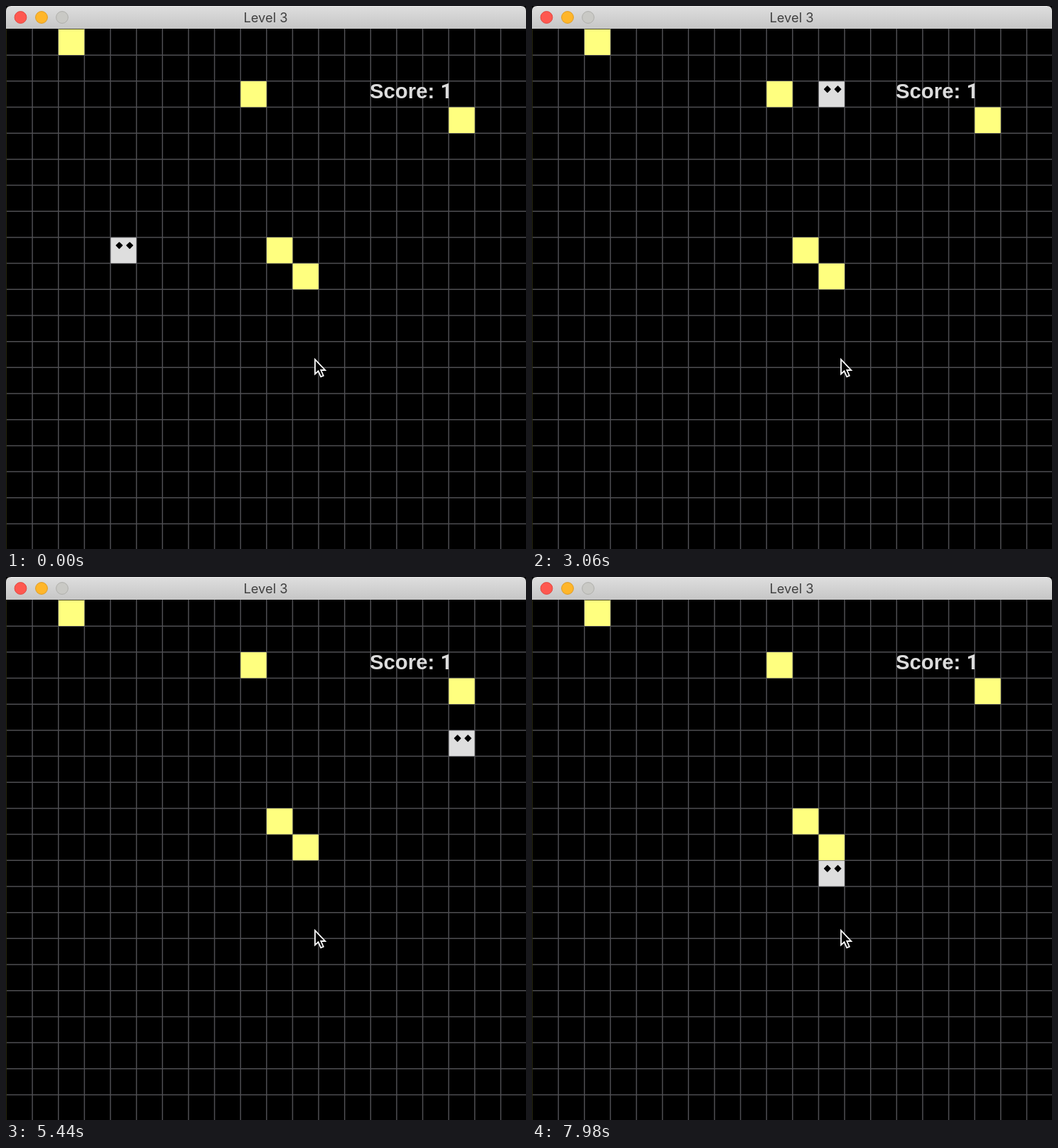
Animation, 732 px wide and 765 px high, one loop 8 s. Source, as an HTML page:

```html
<!DOCTYPE html>
<html lang="en">
<head>
<meta charset="utf-8">
<title>Level 3</title>
<style>
  html, body { margin: 0; width: 100%; height: 100%; overflow: hidden; background: #000; }
  svg { display: block; width: 100vw; height: 100vh; }
</style>
</head>
<body>
<svg viewBox="0 0 732 765" preserveAspectRatio="none">
  <defs>
    <linearGradient id="bar" x2="0" y2="1">
      <stop offset="0" stop-color="#dedede"/>
      <stop offset="1" stop-color="#c6c6c6"/>
    </linearGradient>
  </defs>
  <rect width="732" height="765"/>
  <path id="grid" fill="none" stroke="#4e4e52" stroke-width="1.5"/>
  <path d="M.5 32V765" stroke="#26260c"/>
  <g id="blocks" fill="#ffff7f"></g>
  <g id="player">
    <rect width="36" height="36" fill="#dedede"/>
    <path d="M12 6.8l4.2 4.2-4.2 4.2L7.800 11zM26.700 6.800l4.200 4.200-4.200 4.200L22.500 11z"
      stroke="#000" stroke-width="1.400" stroke-linejoin="round"/>
  </g>
  <g fill="#dcdcdc" font-size="29.300" font-weight="700">
    <text x="512" y="129.500" font-family="'Liberation Sans', Arial, sans-serif">Score:</text>
    <text x="611.500" y="129.500" font-family="Roboto, sans-serif">1</text>
  </g>
  <path d="M0 32V7Q0 0 7 0H725Q732 0 732 7V32Z" fill="url(#bar)"/>
  <path d="M7 .5H725" stroke="#ededed"/>
  <g stroke-width="1">
    <circle cx="20.500" cy="16" r="8.400" fill="#fe5850" stroke="#e24840"/>
    <circle cx="50" cy="16" r="8.400" fill="#ffb62a" stroke="#e09c22"/>
    <circle cx="79" cy="16" r="8.400" fill="#c9c9c5" stroke="#b0b0ac"/>
  </g>
  <text x="365.500" y="23.300" text-anchor="middle" fill="#404040" font-size="18.300"
    font-family="Inter, sans-serif">Level 3</text>
  <path d="M435 498V518.500L439.600 514.300 443.200 522.300 446.800 520.700 443.300 513H449.300Z"
    stroke="#fff" stroke-width="1.800"/>
</svg>
<script>
const LOOP = 8000, STEP = 240, FIRST = 175, CELLS = 20;
const START = [4, 8];
// Legs of the walk: dx, dy, number of cells
const LEGS = [[0, -1, 6], [1, 0, 13], [0, 1, 8], [-1, 0, 6]];
const BLOCKS = [[2, 0], [9, 2], [17, 3], [10, 8], [11, 9]];

const $ = id => document.getElementById(id);
const lineX = c => 0.5 + 36.63 * c;
const lineY = r => 32.5 + 36.68 * r;

let grid = '';
for (let i = 1; i < CELLS; i++) {
  grid += `M${lineX(i)} 32V765M0 ${lineY(i)}H732`;
}
$('grid').setAttribute('d', grid);

$('blocks').innerHTML = BLOCKS.map(([c, r]) =>
  `<rect x="${lineX(c) + 0.2}" y="${lineY(r) + 0.2}" width="36.300" height="36.300"/>`).join('');

function cellAt(time) {
  let left = Math.max(0, Math.floor((time - FIRST) / STEP) + 1);
  let [c, r] = START;
  for (const [dx, dy, length] of LEGS) {
    const n = Math.min(left, length);
    c += dx * n;
    r += dy * n;
    left -= n;
  }
  return [c, r];
}

function draw(time) {
  const [c, r] = cellAt(time);
  $('player').setAttribute('transform', `translate(${lineX(c) + 0.4} ${lineY(r) + 0.4})`);
}

const begin = performance.now();
function tick() {
  draw((performance.now() - begin) % LOOP);
  requestAnimationFrame(tick);
}
draw(0);
requestAnimationFrame(tick);
</script>
</body>
</html>
```
